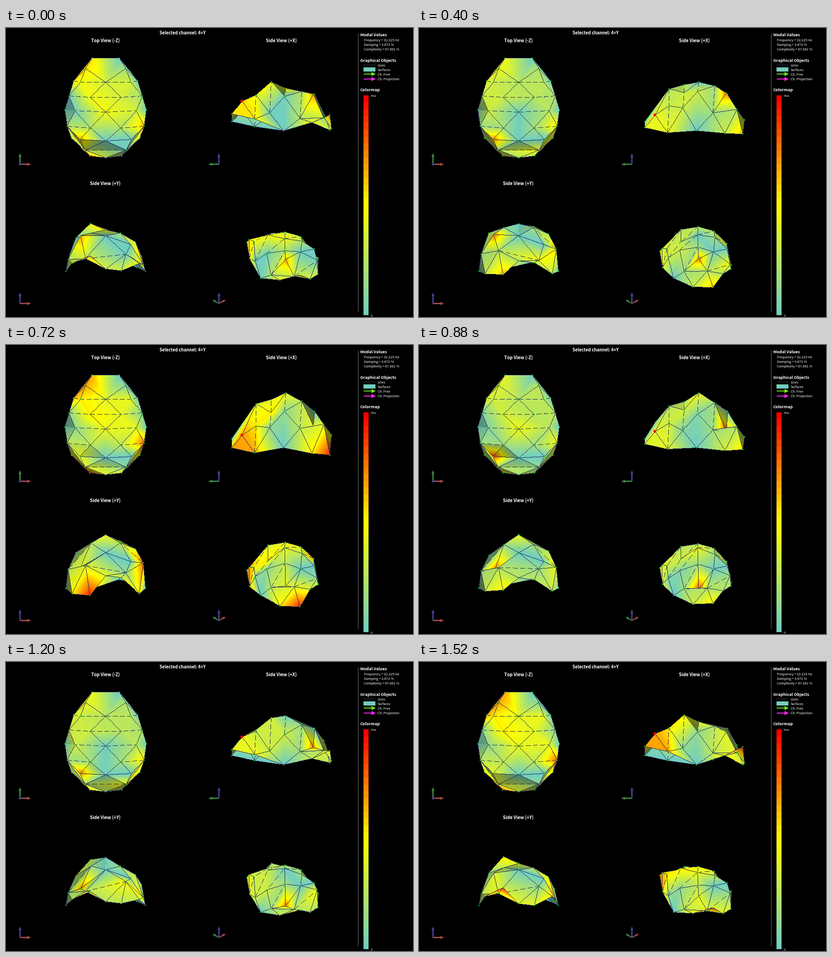
A matplotlib script for the animation above (1600 ms loop, 888x631 px).

```python
from itertools import combinations

import numpy as np
import matplotlib.pyplot as plt
from matplotlib.animation import FuncAnimation
from matplotlib.patches import Circle, Polygon, Rectangle

W, H, DPI = 888, 631, 100
FRAMES, STEP_MS = 20, 80
LEVELS = 32
AXIS = 217
FONT = "Noto Sans CJK JP"

# Left half of the shell: x, y in the top view and depth at rest.
# Digits lie on the axis; a lower-case name is the mirrored node.
HALF = {
    "A": (187, 65, 204), "D": (173, 88, 176), "C": (147, 115, 215),
    "E": (162, 118, 160), "J": (137, 148, 184), "K": (183, 151, 131),
    "N": (128, 178, 224), "O": (150, 180, 148), "S": (133, 214, 190),
    "T": (184, 218, 131), "X": (161, 243, 164), "W": (142, 240, 220),
    "B": (172, 266, 185), "G": (182, 279, 212), "1": (217, 118, 140),
    "2": (217, 183, 117), "3": (217, 246, 144), "4": (217, 283, 208)}

# Nodes that swing together: amplitude and phase in degrees; others rest.
SWING = [("1ekoB4g", 13, -36), ("STt", 9, -36), ("s", 25, -40),
         ("ACD", 21.5, 142), ("EKWw", 17, 146), ("G", 30, 140),
         ("X", 30.4, -132), ("JO", 10, -85), ("dj", 9.5, 52),
         ("b", 14.5, 88), ("2", 14, 2)]
PEAK = max(amp for _, amp, _ in SWING)


def both_sides(names):
    """Add the mirrored partners, each with its letters sorted."""
    return sorted({"".join(sorted(n)) for s in names.split()
                   for n in (s, s.swapcase())})


FACES = both_sides("ADC DEC AD1 Aa1 DE1 CEJ EKJ E1K Kk1 Kk2 JKO KO2 CJN JON "
                   "OSN 2OT OTS 2T3 STX T3X SXB SWB NSW X3B B3b WBG BG4 Bb4")
HIDDEN = both_sides("A1 23 NO EK KO")
DASHED = both_sides("CE E1 JK Kk O2 ST Bb")
EDGES = sorted({a + b for f in FACES for a, b in combinations(f, 2)}
               - set(HIDDEN))

shell = dict(HALF)
for name, (px, py, pz) in HALF.items():
    if name.isalpha():
        shell[name.lower()] = (2 * AXIS - px, py, pz)
ID = {name: i for i, name in enumerate(shell)}
REST = np.array(list(shell.values()), float)
AMP, PHASE = np.zeros((2, len(shell)))
for group, amp, deg in SWING:
    for name in group:
        AMP[ID[name]], PHASE[ID[name]] = amp, np.radians(deg)

TEAL, YELLOW, RED = (115, 207, 190), (255, 255, 0), (255, 0, 0)
LINE_RGB, DOT_RGB = (38, 38, 88), (0, 222, 20)


def colormap(v):
    """Banded teal, yellow, red scale for values from 0 to 1."""
    band = np.clip(np.floor(np.asarray(v) * LEVELS), 0, LEVELS - 1)
    t = band / (LEVELS - 1)
    return np.stack([np.interp(t, (0, .5, 1), ch)
                     for ch in zip(TEAL, YELLOW, RED)], -1)


# Each projection gives screen x, screen y and distance from the viewer.
def top(x, y, s):
    return x, y, s


def side_x(x, y, s):
    return y + 426, s, x


def side_y(x, y, s):
    return AXIS + .977 * (x - AXIS), 312.2 + .977 * s, -y


def iso(x, y, s):
    return (383.9 + .556 * (x + y), 386.3 + .321 * (y - x) + .642 * s,
            (x - y + s) / 3 ** .5)


# Projection with the direction from the shell to the viewer.
VIEWS = [(top, np.array((0, 0, -1))), (side_x, np.array((-1, 0, 0))),
         (side_y, np.array((0, 1, 0))),
         (iso, np.array((-1, 1, -1)) / 3 ** .5)]
LIGHT_SHIFT = np.array((.15, -.35, 0))


def face_light(a, b, c, eye):
    """Brightness of a face lit from beside the viewer."""
    normal = np.cross(b - a, c - a)
    normal = normal / (np.linalg.norm(normal) + 1e-9)
    if normal @ eye < 0:
        normal = -normal
    return np.clip(.5 + 1.8 * normal @ (eye + LIGHT_SHIFT), .5, 1)


def fill_face(img, zbuf, p, v, light):
    (x0, y0, _), (x1, y1, _), (x2, y2, _) = p
    det = (y1 - y2) * (x0 - x2) + (x2 - x1) * (y0 - y2)
    if abs(det) < 1e-6:
        return
    lo = np.floor(p[:, :2].min(0)).astype(int)
    hi = np.ceil(p[:, :2].max(0)).astype(int) + 1
    yy, xx = np.mgrid[lo[1]:hi[1], lo[0]:hi[0]]
    a = ((y1 - y2) * (xx - x2) + (x2 - x1) * (yy - y2)) / det
    b = ((y2 - y0) * (xx - x2) + (x0 - x2) * (yy - y2)) / det
    c = 1 - a - b
    depth = a * p[0, 2] + b * p[1, 2] + c * p[2, 2]
    box = np.s_[lo[1]:hi[1], lo[0]:hi[0]]
    hit = (a >= 0) & (b >= 0) & (c >= 0) & (depth < zbuf[box])
    value = a * v[0] + b * v[1] + c * v[2]
    zbuf[box][hit] = depth[hit]
    img[box][hit] = colormap(value[hit]) * light


def draw_edge(img, zbuf, p, q, dashed):
    n = int(np.abs(q - p)[:2].max()) + 2
    pts = p + (q - p) * np.linspace(0, 1, n)[:, None]
    col, row = np.rint(pts[:, :2]).astype(int).T
    seen = pts[:, 2] < zbuf[row, col] + 3
    if dashed:
        seen &= np.arange(n) % 16 < 11
    img[row[seen], col[seen]] = LINE_RGB


def draw_node(img, zbuf, x, y, depth):
    col, row = round(x), round(y)
    if depth < zbuf[row, col] + 4:
        img[row - 1:row + 2, col] = DOT_RGB
        img[row, col - 1:col + 2] = DOT_RGB


def render(k):
    move = AMP * np.cos(2 * np.pi * k / FRAMES - PHASE)
    nodes = REST.copy()
    nodes[:, 2] += move
    value = np.abs(move) / PEAK
    img = np.zeros((H, W, 3))
    for project, eye in VIEWS:
        zbuf = np.full((H, W), np.inf)
        pts = np.column_stack(project(*nodes.T))
        for face in FACES:
            i = [ID[c] for c in face]
            fill_face(img, zbuf, pts[i], value[i], face_light(*nodes[i], eye))
        for edge in EDGES:
            p, q = (pts[ID[c]] for c in edge)
            draw_edge(img, zbuf, p, q, edge in DASHED)
        for p in pts:
            draw_node(img, zbuf, *p)
    marker = side_x(*nodes[ID["D"]])[:2]
    return img.astype(np.uint8), marker


fig = plt.figure(figsize=(W / DPI, H / DPI), dpi=DPI, facecolor="black")
ax = fig.add_axes([0, 0, 1, 1])
ax.axis("off")
picture = ax.imshow(np.zeros((H, W, 3), np.uint8), interpolation="nearest",
                    extent=(-.5, W - .5, H - .5, -.5), aspect="auto")
picked = ax.add_patch(Circle((0, 0), 3, color="#ff0000", lw=0, zorder=4))


def text(x, y, s, px, bold=False, ha="left"):
    ax.text(x, y, s, fontsize=px * 72 / DPI, family=FONT, color="white",
            weight="bold" if bold else "normal", ha=ha, va="baseline")


def bar(x, y, w, h, color):
    ax.add_patch(Rectangle((x - .5, y - .5), w, h, color=color, lw=0,
                           antialiased=False))


def arrow(x, y, dx, dy, color, width=3, head=8, spread=7):
    """Flat arrow from (x, y) along (dx, dy)."""
    tail, span = np.array((x, y), float), np.array((dx, dy), float)
    u = span / np.hypot(dx, dy)
    n = np.array((-u[1], u[0]))
    tip = tail + span
    neck = tip - u * head
    w, s = n * width / 2, n * spread / 2
    ax.add_patch(Polygon([tail + w, neck + w, neck + s, tip, neck - s,
                          neck - w, tail - w], color=color, lw=0, zorder=3))


# Titles
text(384.5, 14, "Selected channel: 4+Y", 9.4, True, "center")
for x, y, s in ((217, 30.5, "Top View (-Z)"), (600, 30.5, "Side View (+X)"),
                (216, 342.5, "Side View (+Y)")):
    text(x, y, s, 9.7, True, "center")

# Axis triads
AX_R, AX_G, AX_B = "#a04848", "#3c823c", "#40408c"
arrow(30, 297, 24, 0, AX_R)
arrow(30, 297, 0, -24, AX_G)
ax.add_patch(Circle((30, 297), 2.8, color=AX_B, lw=0, zorder=4))
arrow(464, 297, -23, 0, AX_G)
arrow(464, 297, 0, -24, AX_B)
arrow(30, 601, 24, 0, AX_R)
arrow(30, 601, 0, -24, AX_B)
arrow(464, 601, 15, -8, AX_R, 2.5, 7, 6)
arrow(464, 601, -14, -8, AX_G, 2.5, 7, 6)
arrow(464, 601, 0, -24, AX_B)

# Side panel
bar(768, 12, 1, 608, "#6e6e6e")
text(772, 18, "Modal Values", 8.9, True)
for i, s in enumerate(("Frequency = 32.225 Hz", "Damping = 3.672 %",
                       "Complexity = 67.801 %")):
    text(780, 28.5 + 10 * i, s, 7.4)
text(772, 73, "Graphical Objects", 8.9, True)
for i, s in enumerate(("Lines", "Surfaces", "Ch. Free", "Ch. Projection")):
    text(810, 83.5 + 10 * i, s, 7.2)
bar(780, 80, 26, 1, "#3a3a3a")
bar(780, 86, 26, 9, np.array(TEAL) / 255)
arrow(780, 100, 26, 0, "#6eeb14", 2, 9, 9)
arrow(780, 111, 26, 0, "#ff28f0", 2, 9, 9)
text(772, 138, "Colormap", 8.9, True)
scale = colormap((np.arange(480)[::-1] + .5) / 480)[:, None] / 255
ax.imshow(scale, extent=(779.5, 790.5, 626.5, 146.5), aspect="auto",
          interpolation="nearest")
text(792, 149, "- Max", 6)
text(792, 629.5, "- 0", 6)
ax.set_xlim(-.5, W - .5)
ax.set_ylim(H - .5, -.5)

SCENES = [render(k) for k in range(FRAMES)]


def update(k):
    img, marker = SCENES[k]
    picture.set_data(img)
    picked.center = marker
    return picture, picked


anim = FuncAnimation(fig, update, frames=FRAMES, interval=STEP_MS,
                     repeat=True, repeat_delay=0, blit=False)
plt.show()
```
